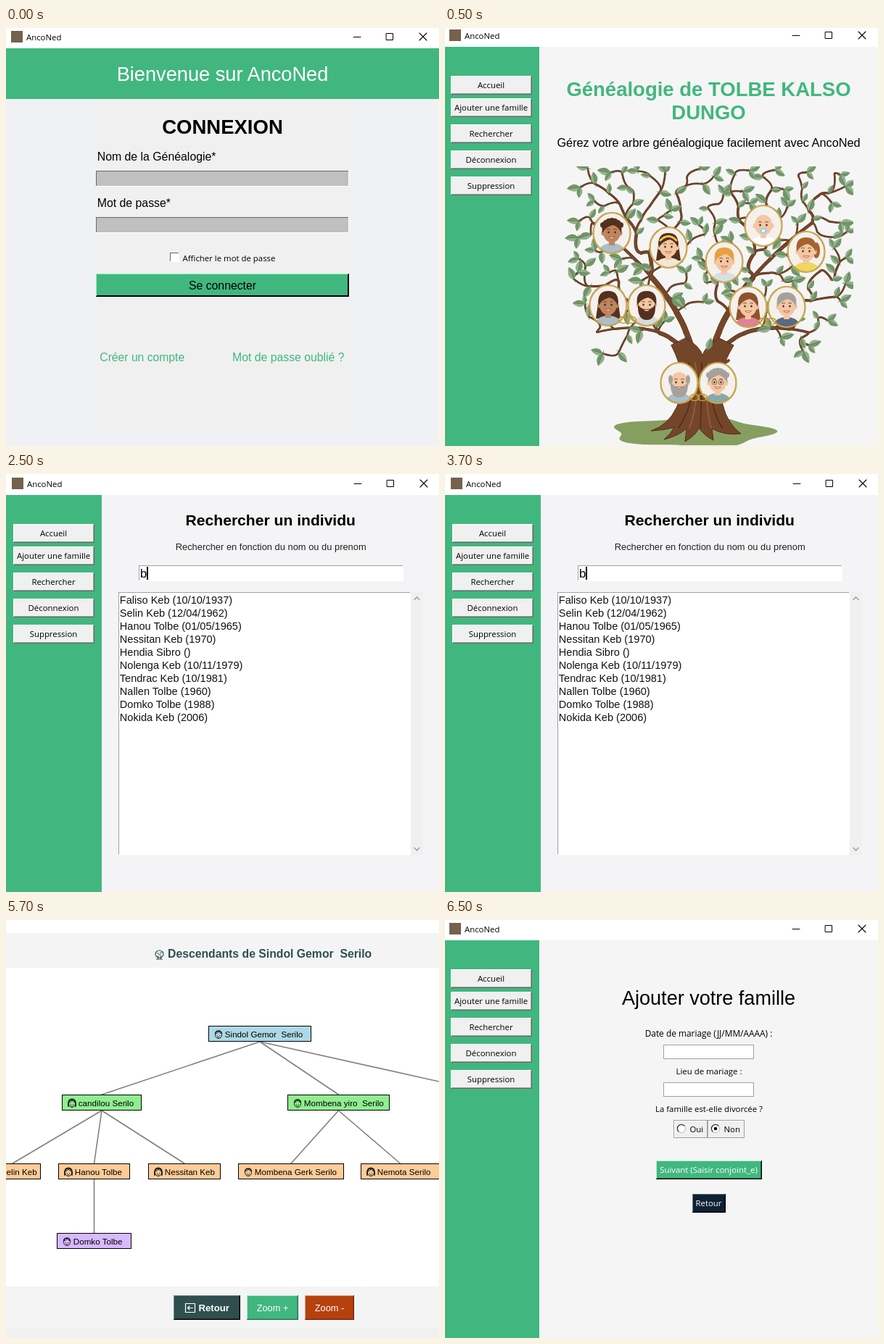
Write an HTML page that moves like this. It is 597 px wide and 577 px high and loops after 8000 ms.

```html
<!DOCTYPE html>
<html lang="fr">
<head>
<meta charset="utf-8">
<title>AncoNed</title>
<style>
html, body { margin: 0; width: 100%; height: 100%; overflow: hidden; background: #fff; }
svg { display: block; width: 597px; height: 577px; }
text { white-space: pre; font-family: "Liberation Sans", Arial, sans-serif; }
.ui { font-family: "Open Sans", "Noto Sans", sans-serif; }
rect { shape-rendering: crispEdges; }
</style>
</head>
<body>
<svg id="stage" viewBox="0 0 597 577" xmlns="http://www.w3.org/2000/svg">
  <defs>
    <g id="leaf">
      <path d="M0 0Q5 -9 17 0Q7 9 0 0Z" fill="#93b18a"/>
      <path d="M0 0Q7 9 17 0Z" fill="#73966b"/>
      <path d="M-4 0H15" stroke="#587a51" stroke-width=".7"/>
    </g>
    <clipPath id="oval"><ellipse rx="25" ry="28"/></clipPath>
    <clipPath id="picture"><rect x="163" y="191" width="400" height="385"/></clipPath>
  </defs>
</svg>
<script>
const GREEN = '#41b77f', APP = 'AncoNed';

const rect = (x, y, w, h, fill) =>
  `<rect x="${x}" y="${y}" width="${w}" height="${h}" fill="${fill}"/>`;
const path = (d, stroke, width = 1, fill = 'none') =>
  `<path d="${d}" stroke="${stroke}" stroke-width="${width}" stroke-linecap="round" fill="${fill}"/>`;
const shape = (d, fill) => `<path d="${d}" fill="${fill}"/>`;
const oval = (x, y, rx, ry, fill, stroke = 'none', width = 1) =>
  `<ellipse cx="${x}" cy="${y}" rx="${rx}" ry="${ry}" fill="${fill}" stroke="${stroke}" stroke-width="${width}"/>`;
const text = (x, y, size, str, { fill = '#000', anchor = 'start', bold = false, cls = '' } = {}) =>
  `<text x="${x}" y="${y}" font-size="${size}" fill="${fill}" text-anchor="${anchor}" ` +
  `${bold ? 'font-weight="700"' : ''} class="${cls}">${str}</text>`;
const mid = (x, y, size, str, opt = {}) => text(x, y, size, str, { anchor: 'middle', ...opt });
const ui = (x, y, str, opt = {}) => mid(x, y, opt.size || 11.4, str, { cls: 'ui', ...opt });
const group = (x, y, body) => `<g transform="translate(${x} ${y})">${body}</g>`;
const repeat = (n, draw) => Array.from({ length: n }, (_, i) => draw(i)).join('');

// Two-pixel edge: light top left, dark bottom right with a softer inner line.
const raised = (x, y, w, h, fill, light = '#fff', dark = '#696969', soft = '#a0a0a0') =>
  rect(x, y, w, h, dark) + rect(x, y, w - 1, h - 1, light) +
  rect(x + 1, y + 1, w - 2, h - 2, soft) + rect(x + 1, y + 1, w - 3, h - 3, fill);
const sunken = (x, y, w, h, fill, edge = '#a39fa3') =>
  rect(x, y, w, h, '#fff') + rect(x, y, w - 1, h - 1, edge) + rect(x + 1, y + 1, w - 2, h - 2, fill);

function titleBar(dx, dy) {
  return rect(0, 0, 597, 26 + dy, '#fff') +
    rect(6 + dx, 2 + dy, 16, 16, '#75624c') +
    text(27 + dx, 15 + dy, 11.4, APP, { cls: 'ui' }) +
    group(dx >> 1, dy, path('M479 10.5H489M524.5 5.5H533.5V14.5H524.5Z', '#000') +
      path('M570 5L580 15M580 5L570 15', '#000', 1.1));
}

function sidebar(dx, dy) {
  const labels = ['Accueil', 'Ajouter une famille', 'Rechercher', 'Déconnexion', 'Suppression'];
  return rect(0, 26 + dy, 130 + dx, 551, GREEN) + group(dx, dy, labels.map((s, i) => {
    const y = i ? 61 + 36 * i : 66;
    return raised(8, y, 112, 26, '#f0f0f0') + ui(63.5, y + 17, s);
  }).join(''));
}

const windowScene = (bg, dx, dy, body) =>
  rect(0, 0, 597, 577, bg) + sidebar(dx, dy) + titleBar(dx, dy) + body;

function login() {
  const field = y => sunken(124, y, 349, 22, '#c0c0c0', '#696969');
  return rect(0, 0, 597, 577, '#eff1f4') + titleBar(1, 2) +
    rect(0, 28, 597, 70, GREEN) + rect(125, 98, 348, 460, '#f0f0f0') +
    mid(298.5, 73, 27.2, 'Bienvenue sur ' + APP, { fill: '#fff' }) +
    mid(298.5, 146, 27.5, 'CONNEXION', { bold: true }) +
    text(125.7, 183, 15.85, 'Nom de la Généalogie*') + field(197) +
    text(125.7, 247, 15.85, 'Mot de passe*') + field(261) +
    sunken(226, 310, 13, 13, '#fff', '#696969') +
    ui(307.5, 321.5, 'Afficher le mot de passe') +
    raised(124, 339, 349, 32, GREEN, '#8ff0bd', '#000', '#000') +
    mid(298.5, 361, 15.8, 'Se connecter') +
    text(129.3, 460, 15.7, 'Créer un compte', { fill: GREEN }) +
    text(312, 460, 15.8, 'Mot de passe oublié ?', { fill: GREEN });
}

// Seeded random numbers keep the foliage the same on every load.
let seed = 11;
const rnd = (a, b) => {
  seed = (seed * 16807) % 2147483647;
  return a + (b - a) * seed / 2147483647;
};

const BARK = '#744629', BARK_EDGE = '#4f2d1b', AXIS = 355;

// Two bent limbs, mirrored on the trunk, then twigs that reach for scattered points.
function growTree() {
  const nodes = [];
  const dist = (p, q) => Math.hypot(p.x - q.x, p.y - q.y);
  const add = (p, parent) => {
    const a = parent ? Math.atan2(p.y - parent.y, p.x - parent.x) : -Math.PI / 2;
    const far = parent ? parent.far + dist(p, parent) : 0;
    const node = { ...p, parent, a, far, tips: 0, twig: false };
    nodes.push(node);
    return node;
  };
  const bend = (t, a, b, c) => (1 - t) ** 2 * a + 2 * t * (1 - t) * b + t * t * c;
  for (const m of [-1, 1]) {
    let low = null, high = null;
    for (let t = 0; t <= 1; t += 1 / 8) {
      low = add({ x: AXIS + m * bend(t, 8, 40, 145), y: bend(t, 475, 395, 420) }, low);
      high = add({ x: AXIS + m * bend(t, 10, 20, 150), y: bend(t, 470, 370, 270) }, high);
    }
  }

  const buds = [];
  for (let y = 201; y < 445; y += 22) {
    for (let x = 178; x < 556; x += 22) {
      const p = { x: x + rnd(-9, 9), y: y + rnd(-8, 8) };
      const off = Math.abs(p.x - 364);
      if (off < 192 - Math.max(0, p.y - 350) * .4 && off > (p.y - 375) * 1.6) buds.push(p);
    }
  }
  const fork = { x: AXIS, y: 440 };
  buds.sort((p, q) => dist(p, fork) - dist(q, fork));
  for (const p of buds) {
    const cost = q => dist(p, q) + .25 * q.far;
    add(p, nodes.reduce((best, q) => cost(q) < cost(best) ? q : best)).twig = true;
  }
  for (const n of [...nodes].reverse()) {
    n.tip = !n.tips;
    n.tips = n.tips || 1;
    if (n.parent) n.parent.tips += n.tips;
  }
  return nodes;
}

const leaf = (x, y, a, s) =>
  `<use href="#leaf" transform="translate(${x.toFixed(1)} ${y.toFixed(1)}) ` +
  `rotate(${(a * 180 / Math.PI).toFixed(0)}) scale(${s.toFixed(2)})"/>`;

function branches(nodes) {
  const draw = (color, extra) => nodes.filter(n => n.parent).map(n => {
    const p = n.parent, reach = Math.hypot(n.x - p.x, n.y - p.y) * .4;
    const cx = p.x + Math.cos(p.a) * reach, cy = p.y + Math.sin(p.a) * reach;
    return path(`M${p.x} ${p.y}Q${cx} ${cy} ${n.x} ${n.y}`, color, .7 + n.tips ** .6 + extra);
  }).join('');
  return draw(BARK_EDGE, .9) + draw(BARK, 0);
}

const foliage = nodes => nodes.filter(n => n.twig).map((n, i) => {
  const k = i % 2 ? 1 : -1;
  const one = turn => leaf(n.x, n.y, n.a + turn, rnd(.75, 1.15));
  if (n.tip) return one(k * rnd(.1, .4)) + one(-k * rnd(.8, 1.3));
  return rnd(0, 1) < .75 ? one(k * rnd(.7, 1.3)) : '';
}).join('');

function grass() {
  const points = Array.from({ length: 60 }, (_, i) => {
    const a = i * Math.PI / 30, r = 1 + .1 * Math.sin(5 * a + 2);
    return `${(340 + 108 * r * Math.cos(a)).toFixed(1)} ${(558 + 20 * r * Math.sin(a)).toFixed(1)}`;
  });
  return shape('M' + points.join('L') + 'Z', '#869f60');
}

const trunk = () =>
  path('M312 438Q338 488 319 524Q308 548 284 556Q304 555 316 551Q311 561 302 568Q322 563 333 553' +
    'L331 571Q347 561 350 552Q358 563 370 569L368 553Q386 563 408 560Q389 546 383 520' +
    'Q368 488 398 438L378 428Q358 440 355 452Q352 440 332 428Z', BARK_EDGE, 1, BARK) +
  path('M372 480L380 466L391 459', BARK, 4) +
  repeat(5, i => path(`M${336 + 9 * i} 462Q${350 + 2 * i} 510 ${322 + 15 * i} 552`,
    i % 2 ? '#95613d' : BARK_EDGE, 1.6));

// Traits: D dark skin, L long hair, H headband, T ponytail, C curls, B beard, N bald top, G glasses, P baby.
function portrait([x, y, hair, shirt, traits]) {
  const has = f => traits.includes(f);
  const skin = has('D') ? '#bf855c' : '#f4c6a2';
  let s = oval(0, 0, 25, 28, '#f4f0ec');
  if (has('L')) s += shape('M-14 -3Q-14 -19 0 -19Q14 -19 14 -3L17 18H-17Z', hair);
  if (has('T')) s += oval(14, -2, 5, 11, hair);
  s += oval(0, 28, 19, 14, shirt) + rect(-4, 8, 8, 9, skin) +
    oval(-12, 0, 2.5, 3.5, skin) + oval(12, 0, 2.5, 3.5, skin) + oval(0, -1, 12, 14, skin);
  if (has('B')) s += shape('M-12 -2Q-13 20 0 20Q13 20 12 -2Q8 6 0 5Q-8 6 -12 -2Z', hair);
  if (has('N')) s += oval(-12, -5, 3, 6, hair) + oval(12, -5, 3, 6, hair);
  else if (!has('P')) s += shape('M-13 0Q-16 -20 0 -20Q16 -20 13 0Q10 -8 2 -11Q-8 -9 -13 0Z', hair);
  if (has('C')) s += repeat(7, i => oval(-12 + i * 4, -11 - 6 * Math.sin(i * Math.PI / 6), 4, 4, hair));
  if (has('H')) s += path('M-11 -10Q0 -21 11 -10', '#edc94c', 3);
  for (const k of [-4.5, 4.5]) {
    s += oval(k, -1, 1.2, 1.6, '#33241d') + path(`M${k - 2} -5Q${k} -6.5 ${k + 2} -5`, '#56392a', .9);
    if (has('G')) s += oval(k, -1, 3.5, 3.5, 'none', '#77706a', .9);
  }
  s += has('P') ? oval(0, 7, 5, 4, '#9ed2e5') + oval(0, 7, 2, 2, '#fff')
    : path('M-4 6Q0 10 4 6Z', '#a8513f', .8, '#fff');
  return group(x, y, `<g clip-path="url(#oval)">${s}</g>` +
    oval(0, 0, 25.5, 28, 'none', '#b58b30', 2.2) + oval(0, 0, 25.5, 28, 'none', '#e6cb78', .8));
}

function family() {
  const brown = '#55301d', grey = '#a5a19d', blue = '#a9bfcb';
  const children = [
    [230, 283, brown, blue, 'DC'], [308, 303, brown, '#f1e7d5', 'LH'],
    [385, 323, '#e5a142', '#d5e0e6', ''], [439, 273, grey, '#fff', 'P'],
    [498, 309, '#a6622f', '#efd75e', 'T']
  ];
  const couples = [
    [225, 383, [brown, blue, 'DL'], [brown, '#d5dade', 'B']],
    [418, 385, ['#8d512e', '#df8297', 'L'], [grey, '#566c82', '']],
    [323, 490, [grey, blue, 'NB'], [grey, '#87a9ad', 'CG']]
  ];
  return children.map(portrait).join('') + couples.map(([x, y, one, two]) =>
    portrait([x, y, ...one]) + portrait([x + 53, y, ...two]) +
    repeat(2, i => oval(x + 21 + 11 * i, y + 20, 6.5, 4.5, 'none', '#c49a33', 1.6))).join('');
}

function home() {
  const title = { fill: GREEN, bold: true }, nodes = growTree();
  return windowScene('#f5f5f5', 0, 0,
    mid(363.5, 94, 27.5, 'Généalogie de TOLBE KALSO', title) + mid(363.5, 126, 27.5, 'DUNGO', title) +
    mid(363.5, 164, 16.3, `Gérez votre arbre généalogique facilement avec ${APP}`) +
    `<g clip-path="url(#picture)">${grass()}${branches(nodes)}${trunk()}${foliage(nodes)}` +
    `${leaf(362, 444, -1.3, 1)}${family()}</g>`);
}

function search() {
  const rows = ['Faliso Keb (10/10/1937)', 'Selin Keb (12/04/1962)', 'Hanou Tolbe (01/05/1965)',
    'Nessitan Keb (1970)', 'Hendia Sibro ()', 'Nolenga Keb (10/11/1979)', 'Tendrac Keb (10/1981)',
    'Nallen Tolbe (1960)', 'Domko Tolbe (1988)', 'Nokida Keb (2006)'];
  return windowScene('#f4f4f7', 2, 3,
    mid(364.8, 71, 21.1, 'Rechercher un individu', { bold: true }) +
    mid(365.2, 105, 12.9, 'Rechercher en fonction du nom ou du prenom', { fill: '#222' }) +
    sunken(183, 126, 365, 22, '#fff') + text(185, 143, 16.5, 'b') + rect(194, 128, 2, 18, '#000') +
    sunken(155, 163, 403, 363, '#fff') + rect(558, 163, 17, 363, '#f0f0f0') +
    path('M563 173.5L566.5 170L570 173.5M563 516L566.5 519.5L570 516', '#a3a3a3', 1.6) +
    rows.map((s, i) => text(156.8, 178.7 + 18 * i, 14.55, s, { fill: '#111' })).join(''));
}

// Small outlined head, with longer hair for women.
const head = (x, y, woman) => group(x, y,
  oval(0, .5, 4.6, 5, 'none', '#222') +
  path('M-4.5 -1Q-1 -1 0 -4Q1 -2 4.5 -1M-2 1.5H-1.5M1.5 1.5H2M-1.5 3.5Q0 4.5 1.5 3.5', '#222', .9) +
  (woman ? path('M-5 4Q-6 -6 0 -5.5Q6 -6 5 4', '#222', 1.8) : path('M-4.5 -1Q-4 -5 0 -5Q4 -5 4.5 -1', '#222', 1.4)));

function descendants() {
  const INK = '#2f4f4f';
  const tones = ['#add8e6', '#90ee90', '#ffcc99', '#d8b9ff'];
  const top = row => Math.floor(146 + 95.4 * row);
  const node = (row, x, w, name, woman, children = []) => ({ row, x, w, name, woman, children });
  const root = node(0, 279, 142, 'Sindol Gemor  Serilo', false, [
    node(1, 77, 110, 'candilou Serilo', true, [
      node(2, -30, 78, 'Selin Keb', false),
      node(2, 72, 99, 'Hanou Tolbe', true, [node(3, 70, 103, 'Domko Tolbe', false)]),
      node(2, 196, 100, 'Nessitan Keb', true)
    ]),
    node(1, 388, 141, 'Mombena yiro  Serilo', false, [
      node(2, 320, 146, 'Mombena Gerk Serilo', false),
      node(2, 489, 109, 'Nemota Serilo', true)
    ]),
    node(1, 623, 110, 'Nolenga Serilo', true)
  ]);
  const draw = n => {
    const y = top(n.row), c = n.x + n.w / 2;
    return n.children.map(k =>
      path(`M${c} ${y + 22}L${k.x + k.w / 2} ${top(k.row)}`, '#808080', 1.6) + draw(k)).join('') +
      rect(n.x, y, n.w, 22, '#000') + rect(n.x + 1, y + 1, n.w - 2, 20, tones[n.row]) +
      head(n.x + 14, y + 12, n.woman) + text(n.x + 22.8, y + 16, 11.65, n.name);
  };
  return rect(0, 0, 597, 577, '#fff') + rect(0, 18, 597, 48, '#f4f4f4') +
    rect(0, 506, 597, 58, '#f4f4f4') + rect(0, 564, 597, 13, '#f0f0f0') +
    group(211.5, 48, oval(0, -1, 5.5, 5, 'none', INK, 1.2) +
      path('M-2 2V6H2V2M-4 6H4M-3 -2H-1M1 -3H3M-1 0H2', INK, 1.2)) +
    text(223, 51.5, 15.77, 'Descendants de Sindol Gemor  Serilo', { fill: INK, bold: true }) +
    draw(root) +
    raised(231, 518, 92, 34, INK, '#71898a', '#000', '#182828') +
    path('M250 529.5H247.5V541.5H250M258 529.5H260.5V541.5H258M250 529.5H258M250 541.5H258M257.5 535.5H250.5M253 533L250.5 535.5L253 538', '#fff', 1.2) +
    text(265.5, 540, 13.2, 'Retour', { fill: '#fff', bold: true }) +
    raised(332, 518, 71, 34, GREEN, '#b5e6cd', '#26704d', '#35996a') +
    mid(367.5, 539.5, 12.8, 'Zoom +', { fill: '#fff' }) +
    raised(412, 518, 68, 34, '#b7410e', '#e0a386', '#70270a', '#98360c') +
    mid(446, 539.5, 12.8, 'Zoom -', { fill: '#fff' });
}

function addFamily() {
  const field = y => rect(301, y, 125, 20, '#a0a0a0') + rect(302, y + 1, 123, 18, '#fff');
  const radio = (x, w, label, on) =>
    rect(x, 276, w, 25, '#a0a0a0') + rect(x + 1, 277, w - 2, 23, '#fff') + rect(x + 2, 278, w - 3, 22, '#f0f0f0') +
    oval(x + 11, 288, 5.5, 5.5, '#fff', '#b8b8b8') +
    path(`M${x + 7} 292A5.5 5.5 0 0 1 ${x + 15} 284`, '#333', 1.2) +
    (on ? oval(x + 11, 288, 2.3, 2.3, '#000') : '') +
    text(x + 22.5, 292.5, 11.4, label, { cls: 'ui' });
  return windowScene('#f5f5f5', 0, 2,
    mid(363.5, 117, 27.05, 'Ajouter votre famille') +
    ui(363.5, 161, 'Date de mariage (JJ/MM/AAAA) :', { size: 11.9 }) + field(172) +
    ui(364, 213, 'Lieu de mariage :') + field(224) +
    ui(364, 265, 'La famille est-elle divorcée ?') +
    radio(315, 47, 'Oui', false) + radio(362, 51, 'Non', true) +
    raised(291, 332, 146, 26, GREEN, '#b5f0d1', '#000', '#20593d') +
    ui(363.5, 349, 'Suivant (Saisir conjoint_e)', { fill: '#fff' }) +
    raised(341, 378, 46, 26, '#0f2033', '#6f7a86', '#000', '#08111b') +
    ui(363.5, 395, 'Retour', { fill: '#fff' }));
}

const LOOP = 8000, FIRST = 500, STAY = 2000;
const stage = document.getElementById('stage');
const scenes = [login, home, search, descendants, addFamily].map(draw => {
  const g = document.createElementNS('http://www.w3.org/2000/svg', 'g');
  g.innerHTML = draw();
  stage.append(g);
  return g;
});

function show(time) {
  const t = time % LOOP;
  const now = t < FIRST ? 0 : 1 + Math.floor((t - FIRST) / STAY);
  scenes.forEach((g, i) => g.setAttribute('display', i === now ? 'inline' : 'none'));
}

const begin = performance.now();
function tick() {
  show(performance.now() - begin);
  requestAnimationFrame(tick);
}
tick();
</script>
</body>
</html>
```
